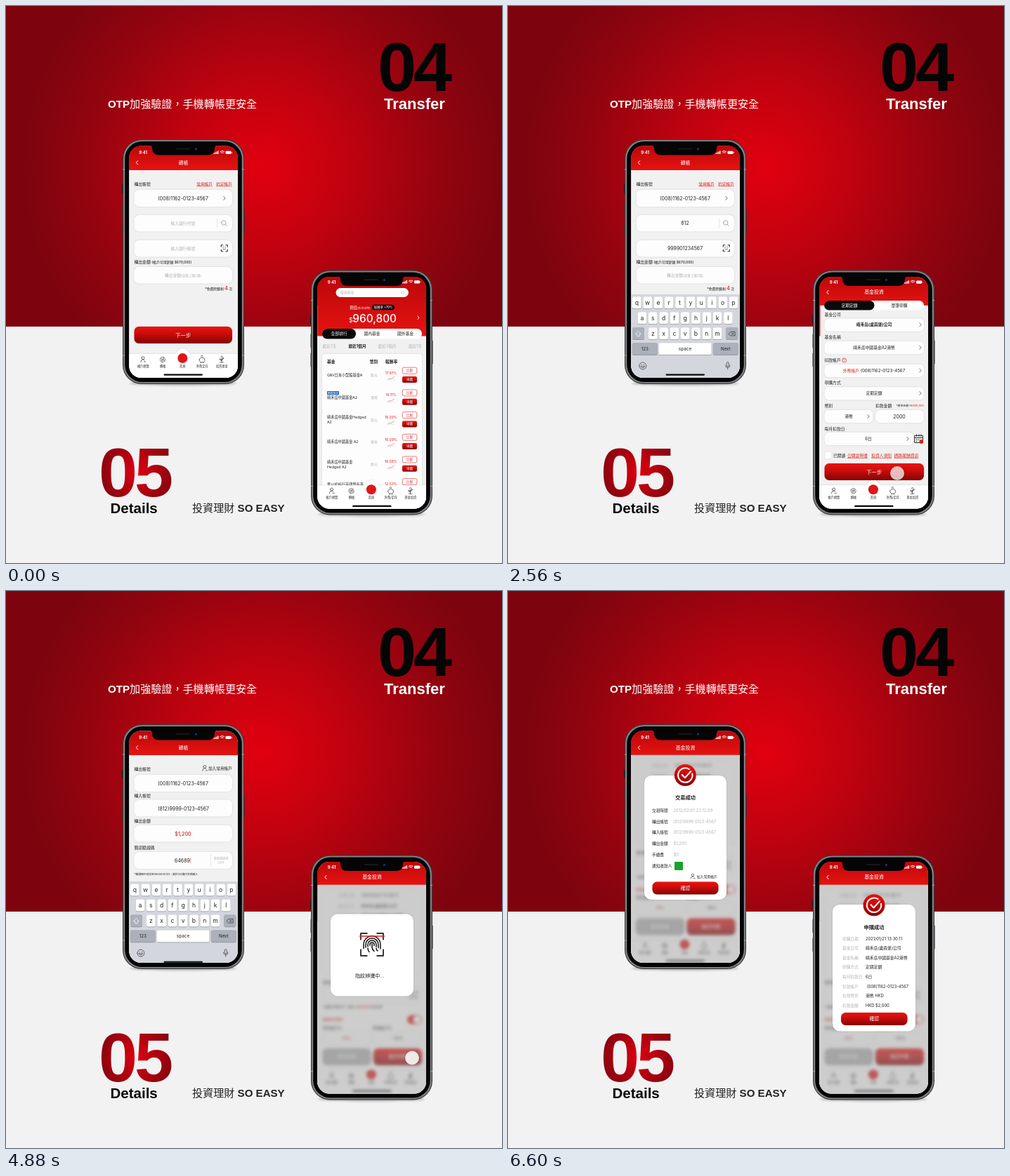
An HTML page for the animation above (6640 ms loop, 706x794 px).

```html
<!DOCTYPE html>
<html lang="zh-Hant">
<head>
<meta charset="utf-8">
<title>Transfer / Details</title>
<style>
html, body { margin: 0; width: 100%; height: 100%; overflow: hidden; background: #f2f2f2; }
svg { display: block; }
text { font-family: Inter, "Noto Sans CJK TC", "Noto Sans CJK JP", sans-serif; fill: #222; white-space: pre; }
.arial { font-family: "Liberation Sans", Arial, "Noto Sans CJK TC", sans-serif; }
.m { text-anchor: middle; }
.e { text-anchor: end; }
.b { font-weight: 500; }
.thin { font-weight: 300; }
.h { font-weight: 700; }
.big { font-size: 99px; letter-spacing: -4px; }
.r { fill: #e0201c; }
.g { fill: #b4b4b4; }
.w { fill: #fff; }
.u { text-decoration: underline; text-decoration-thickness: .4px; text-underline-offset: 1px; }
.card { filter: drop-shadow(0 .8px .9px #0002); }
.line { fill: none; stroke: #333; stroke-width: .7; stroke-linecap: round; stroke-linejoin: round; }
.blur { filter: blur(2.2px); mix-blend-mode: multiply; opacity: .62; }
.touch { fill: #fafafa; filter: drop-shadow(0 .6px 1px #0007); }
.a { animation: 6.64s ease-in-out infinite; }

@keyframes transferPage { 0%, 52.7% { transform: none } 56.3%, 100% { transform: translateX(-157px) } }
@keyframes listPage { 0%, 11.1% { transform: none } 14.2%, 100% { transform: translateX(-157px) } }
@keyframes fundPage { 0%, 44.45% { transform: none } 48.1%, 100% { transform: translateX(-157px) } }
@keyframes leftKeys {
  0%, 5.4%, 51.5%, 62.7%, 75.9%, 100% { transform: translateY(121px) }
  8.4%, 49.7%, 65.4%, 73.2% { transform: none }
}
@keyframes rightKeys {
  0%, 18.7%, 35.8%, 100% { transform: translateY(121px) }
  21.7%, 33.1% { transform: none }
}
@keyframes finger { 0%, 53.6%, 76.2%, 100% { opacity: 0 } 56%, 73.8% { opacity: 1 } }
@keyframes leftDone { 0%, 84.6% { opacity: 0 } 87.3%, 100% { opacity: 1 } }
@keyframes rightDone { 0%, 84.9% { opacity: 0 } 87.7%, 100% { opacity: 1 } }
@keyframes leftTouch {
  0%, 1.8% { transform: translate(231px, 309px); opacity: 0 }
  3.6%, 4.5% { transform: translate(231px, 309px); opacity: .9 }
  6.3% { transform: translate(231px, 309px); opacity: 0 }
  12.8% { transform: translate(231px, 344.5px); opacity: 0 }
  14.3%, 28.6% { transform: translate(231px, 344.5px); opacity: .9 }
  31.6% { transform: translate(231px, 344.5px); opacity: 0 }
  39.8% { transform: translate(221px, 383px); opacity: 0 }
  41.6%, 47.6% { transform: translate(221px, 383px); opacity: .9 }
  50.6% { transform: translate(252px, 469px); opacity: .7 }
  52.4% { transform: translate(252px, 469px); opacity: 0 }
  55.1% { transform: translate(235px, 379.5px); opacity: 0 }
  56.6%, 61.7% { transform: translate(235px, 379.5px); opacity: 1 }
  63.3% { transform: translate(235px, 379.5px); opacity: 0 }
  78.9% { transform: translate(269px, 470px); opacity: 0 }
  80.4% { transform: translate(269px, 470px); opacity: .9 }
  82.5%, 84.3% { transform: translate(269px, 470px); opacity: .32 }
  85.2%, 100% { transform: translate(269px, 470px); opacity: 0 }
}
@keyframes rightTouch {
  0%, 6.3% { transform: translate(574px, 565px); opacity: 0 }
  7.8% { transform: translate(574px, 565px); opacity: .9 }
  9.9% { transform: translate(574px, 565px); opacity: .4 }
  11.4% { transform: translate(574px, 565px); opacity: 0 }
  13.9% { transform: translate(570px, 576.5px); opacity: 0 }
  15.1% { transform: translate(570px, 576.5px); opacity: .5 }
  16.6% { transform: translate(569px, 577px); opacity: .9 }
  27.7% { transform: translate(566px, 578px); opacity: .5 }
  30.1% { transform: translate(566px, 578px); opacity: 0 }
  37% { transform: translate(554px, 666px); opacity: 0 }
  39.2% { transform: translate(554px, 666px); opacity: .9 }
  41.6%, 47.6% { transform: translate(554px, 666px); opacity: .35 }
  52.4% { transform: translate(581px, 590px); opacity: .9 }
  57%, 62.7% { transform: translate(581px, 594px); opacity: .95 }
  71.7% { transform: translate(578px, 664px); opacity: .9 }
  75.9% { transform: translate(578px, 668px); opacity: .9 }
  81.9%, 84.3% { transform: translate(578px, 668px); opacity: .35 }
  85.2%, 100% { transform: translate(578px, 668px); opacity: 0 }
}
@keyframes scan { from { transform: translateY(-15px) } to { transform: translateY(10px) } }
#beam { animation: scan .83s linear infinite alternate; }
</style>
</head>
<body>
<svg id="stage" width="706" height="794" viewBox="0 0 706 794"></svg>
<script>
const LOOP = 6640;
const stage = document.getElementById('stage');

// y is the vertical middle of the line of text
const text = (x, y, size, str, cls = '', id = '') =>
  `<text x="${x}" y="${(y + size * .36).toFixed(2)}" font-size="${size}" class="${cls}" id="${id}">${str}</text>`;
const box = (x0, y0, x1, y1, r, fill = '#fdfdfd', cls = '') =>
  `<rect x="${x0}" y="${y0}" width="${x1 - x0}" height="${y1 - y0}" rx="${r}" fill="${fill}" class="${cls}"/>`;
const field = (x0, y0, x1, y1, r = 7) => box(x0, y0, x1, y1, r, '#fdfdfd', 'card');
const line = (d, extra = '') => `<path class="line" d="${d}" ${extra}/>`;
const dot = (x, y, r, fill) => `<circle cx="${x}" cy="${y}" r="${r}" fill="${fill}"/>`;
const at = (x, y, body) => `<g transform="translate(${x} ${y})">${body}</g>`;
const move = (name, body) => `<g class="a" style="animation-name:${name}">${body}</g>`;
const span = (cls, str, size) => `<tspan class="${cls}" ${size ? `font-size="${size}"` : ''}>${str}</tspan>`;
const arrow = (x, y) => line(`M${x - 1.2} ${y - 2.5}l2.4 2.5l-2.4 2.5`, 'stroke="#777"');
const button = (x0, y0, x1, y1, str, size = 7, fill = 'url(#btn)') =>
  box(x0, y0, x1, y1, 6.5, fill, 'card') + text((x0 + x1) / 2, (y0 + y1) / 2, size, str, 'm w');
const typed = (x, y, id, hint, hintX = x) =>
  text(hintX, y, 5.8, hint, 'm g', id + 'Hint') + text(x, y, 7, '', 'm', id);
const corners = (cx, cy, s, w) => line([[-1, -1], [1, -1], [1, 1], [-1, 1]].map(([a, b]) =>
  `M${cx + a * s} ${cy + b * s * .45}V${cy + b * s}H${cx + a * s * .45}`).join(''), `style="stroke-width:${w}"`);
const scanIcon = (x, y) => corners(x, y, 4.5, 1.1) + line(`M${x - 2} ${y + 1}q2 2 4 0M${x - 2} ${y - 1.5}h1M${x + 1} ${y - 1.5}h1`);
const person = (x, y, s = 1) => at(x, y, `<g transform="scale(${s})">` +
  line('M-2 -1.8a2 2 0 1 1 4 0a2 2 0 1 1 -4 0M-3.2 4q.2 -3.6 3.2 -3.6q1.5 0 2.3 1M1.4 3.6h2.4') + '</g>');

const defs = `<defs>
  <radialGradient id="sky" gradientUnits="userSpaceOnUse" cx="365" cy="230" r="340">
    <stop offset="0" stop-color="#e1000f"/><stop offset=".35" stop-color="#c1020f"/>
    <stop offset=".75" stop-color="#92040f"/><stop offset="1" stop-color="#7d040e"/></radialGradient>
  <radialGradient id="five" gradientUnits="userSpaceOnUse" cx="186" cy="664" r="58">
    <stop offset="0" stop-color="#df0010"/><stop offset="1" stop-color="#80050f"/></radialGradient>
  <linearGradient id="btn" x2="0" y2="1"><stop offset="0" stop-color="#e8130f"/>
    <stop offset=".4" stop-color="#cd0d0c"/><stop offset="1" stop-color="#850303"/></linearGradient>
  <linearGradient id="head" x2="0" y2="1"><stop offset="0" stop-color="#ba070b"/>
    <stop offset="1" stop-color="#e61310"/></linearGradient>
  <clipPath id="glass"><rect x="175.3" y="199.5" width="154.7" height="330.5" rx="17"/></clipPath>
  <clipPath id="glass2"><rect x="443.3" y="386" width="154.7" height="330.5" rx="17"/></clipPath>
  <clipPath id="below"><rect x="440" y="419" width="162" height="300"/></clipPath>
</defs>`;

const body = () => `<ellipse cx="252" cy="538" rx="76" ry="3" fill="#0004" style="filter:blur(1.5px)"/>` +
  box(165, 254, 168, 267, 1, '#1c1c1e') + box(165.5, 281, 168, 301, 1, '#333') + box(165.5, 308, 168, 328, 1, '#333') +
  box(337, 290, 339.6, 324, 1, '#333') + box(166, 190, 339, 539, 27, '#3c3c3f') +
  box(167.2, 191.2, 337.8, 537.8, 26, '#85868a') + box(169.2, 193, 335.8, 536, 24.5, '#050506') +
  line('M166.3 233h2.500M336.200 233h2.500M166.3 498h2.500M336.200 498h2.500', 'style="stroke:#bbb"');
const notch = () => `<path d="M204 198.5q4 .5 4 4q0 10 10 10h69q10 0 10 -10q0 -3.500 4 -4z" fill="#050506"/>` +
  box(242, 202.8, 262, 204.4, .8, '#1b1b1e') + dot(270.5, 204, 1.7, '#17306e');
const phone = (dx, dy, clip, screens) =>
  at(dx, dy, body()) + `<g clip-path="url(#${clip})">${screens}</g>` + at(dx, dy, notch());

const header = (dx, dy, title, height = 35) => at(dx, dy,
  box(173, 198, 333, 199 + height, 0, 'url(#head)') + text(195, 209, 5.7, '9:41', 'm w h') +
  [0, 1, 2, 3].map(i => box(295.5 + i * 1.9, 209.5 - i, 296.8 + i * 1.9, 211, .3, '#fff')).join('') +
  line('M304.800 207.600q2.900 -2.600 5.800 0M306.200 209.200q1.500 -1.300 3 0', 'style="stroke:#fff;stroke-width:1"') +
  box(312.5, 206.7, 320.5, 211, 1.2, '#fff') + box(321, 208, 321.8, 209.8, .3, '#fff') +
  (title ? text(252.5, 223.2, 6.9, title, 'm w b') +
    line('M187.600 220.700l-2.300 2.600l2.300 2.600', 'style="stroke:#fff;stroke-width:1"') : ''));

const homeBar = () => box(224.5, 524.5, 280, 526.7, 1.1, '#0a0a0a');
const tabIcons = [
  person(195, 503.5),
  at(223, 504, line('M-3.800 0a3.800 3.800 0 0 1 7.300 -1.400M3.800 0a3.800 3.800 0 0 1 -7.300 1.400M-2 -.8h4l-1.200 -1.200M2 .9h-4l1.200 1.200')),
  dot(251.3, 502, 7, '#df1616'),
  at(279, 504.5, line('M-4 -.5q1 -2.700 4 -2.700q4 0 4 3.200q0 1.600 -1.300 2.700v1.300h-1.500v-.8h-2v.8h-1.500v-1.300q-1.700 -1 -1.700 -3.200M-1.200 -4.500a1.200 1.200 0 1 1 2 0')),
  at(307, 504, line('M0 4v-5M0 1.500q-3 0 -3 -2.500q3 0 3 2.500M0 0q3 0 3 -2.500q-3 0 -3 2.500M-2.500 4h5M-1 -3a1.200 1.200 0 1 1 2 0'))
].join('');
const tabBar = (dx, dy, labels) => at(dx, dy,
  `<g class="card"><path d="M173 496h66q3 0 4 -2.500a9.500 9.500 0 0 1 16.600 0q1 2.500 4 2.500h70v36h-161z" fill="#fff"/></g>` +
  tabIcons + labels.map((s, i) => text(195.3 + i * 28, 513.6, 4.2, s, 'm b')).join('') + homeBar());
const leftTabs = () => tabBar(0, 0, ['帳戶總覽', '轉帳', '首頁', '外幣定存', '投資基金']);
const rightTabs = () => tabBar(268.6, 187.3, ['帳戶總覽', '轉帳', '首頁', '外幣/定存', '基金投資']);
const paper = (dx = 0, dy = 0) => at(dx, dy, box(173, 198, 333, 533, 0, '#f1f1f1'));

const key = (x, y, w, s, fill = '#fff', cls = '', size = 8.6) =>
  box(x - w / 2, y - 8.7, x + w / 2, y + 8.7, 2.3, '#8d9096') + box(x - w / 2, y - 9, x + w / 2, y + 8, 2.3, fill) +
  text(x, y - .3, size, s, 'm ' + cls);
const keyboard = (action, fill, cls) => {
  const row = (letters, x, y) => [...letters].map((c, i) => key(x + i * 15.3, y, 12.6, c)).join('');
  const grey = '#abb0ba';
  return box(173, 411, 333, 533, 0, '#d3d6dc') +
    row('qwertyuiop', 183.3, 423.3) + row('asdfghjkl', 191, 445.3) + row('zxcvbnm', 206.3, 467.3) +
    key(185.5, 467.3, 17, '', grey) + line('M185.500 463.500l3.800 4h-2v3.200h-3.600v-3.200h-2z', 'style="stroke:#fff"') +
    key(318.8, 467.3, 17, '', grey) + line('M314.300 467.200l2.600 -2.800h6.200v5.600h-6.200zM318.300 465.800l2.800 2.800M321.100 465.800l-2.800 2.800') +
    key(194.8, 489.3, 36, '123', grey, '', 6.2) + key(252, 489.3, 75, 'space', '#fff', '', 6.4) +
    key(309.8, 489.3, 36, action, fill || grey, cls, 6.2) +
    line('M186.800 513a5 5 0 1 1 10 0a5 5 0 1 1 -10 0M189 514q2.800 3.600 5.600 0zM190 511v.8M193.600 511v.8') +
    line('M311.200 511.500v-2.400a1.500 1.500 0 0 1 3 0v3.400a1.500 1.500 0 0 1 -3 0zM309.400 512q0 3.400 3.300 3.400q3.300 0 3.300 -3.400M312.700 515.400v2.400') +
    homeBar();
};

const account = '(008)1162-0123-4567';
const payee = '(812)9999-0123-4567';
const label = (x, y, s, size = 5.8) => text(x, y, size, s, 'b');

const transferPage = paper() + header(0, 0, '轉帳') +
  label(182.5, 253.5, '轉出帳號') + text(294, 253.5, 5.7, '常用帳戶', 'e r u') + text(322, 253.5, 5.7, '約定帳戶', 'e r u') +
  field(182.5, 262, 322, 286) + text(252, 274, 7, account, 'm') + arrow(311, 274) +
  field(182.5, 298, 322, 321.5) + typed(252, 309.5, 'bank', '輸入銀行代號') +
  line('M300.500 303v13', 'style="stroke:#ddd"') + line('M306.600 309a3.200 3.200 0 1 1 6.400 0a3.200 3.200 0 1 1 -6.400 0M312.200 311.500l2 2.200', 'style="stroke:#888"') +
  field(182.5, 334, 322, 357.5) + typed(252, 345.5, 'payee', '輸入銀行帳號') + scanIcon(310.8, 345.3) +
  text(182.5, 365, 5.8, '轉出金額 ' + span('', '(帳戶可用餘額 $670,000)', 4.9), 'b') +
  field(182.5, 372, 322, 395.5) + typed(252, 384, 'sum', '轉出金額' + span('', '(單筆上限2萬)', 4.6)) +
  text(322, 403, 4.8, '*免費跨轉剩 ' + span('r', '4', 7.5) + ' 次', 'e b') +
  button(182.5, 457, 322, 481, '下一步', 7.3) + leftTabs();

const confirmTransfer = paper() + header(0, 0, '轉帳') +
  label(182.5, 253.5, '轉出帳號') + person(282.8, 252.3) + text(322, 253, 5.7, '加入常用帳戶', 'e') +
  field(182.5, 262, 322, 286) + text(252, 274, 7, account, 'm') +
  label(182.5, 292.3, '轉入帳號') + field(182.5, 297.5, 322, 321.5) + text(252.5, 310, 7, payee, 'm') +
  label(182.5, 328, '轉出金額') + field(182.5, 334, 322, 357.5) + text(252, 346, 7.2, '$1,200', 'm r b') +
  label(182.5, 365.8, '簡訊驗證碼') + field(182.5, 372, 322, 396) + typed(252, 384, 'code', '輸入驗證碼', 246.5) +
  line('M291.500 376v15', 'style="stroke:#ddd"') + text(306, 381.3, 4.1, '重寄驗證碼', 'm g') + text(306, 387, 4.4, '', 'm g', 'count') +
  text(182.5, 403.7, 3.75, '*驗證碼已發送至0900000123，請於3分鐘內完成輸入') +
  text(252, 439.8, 5.7, span('r', '【注意】') + '交易款項將從您的帳戶轉出,', 'm b') +
  text(252, 448.3, 5.7, '請再次確認。確保交易安全。', 'm b') +
  button(182.5, 457, 250.5, 481, '修改內容', 6.6, '#afafaf') + button(254, 457, 322, 481, '立即轉出', 6.6) + leftTabs();

const funds = [
  [['Q&amp;V日本小型股基金A'], '歐元', '17.97%'],
  [['晴禾岳中國基金A2'], '港幣', '16.11%'],
  [['晴禾岳中國基金Hedged', 'A2'], '美元', '16.09%'],
  [['晴禾岳中國基金 A2'], '基金', '16.09%'],
  [['晴禾岳中國基金', 'Hedged A2'], '歐元', '16.08%'],
  [['雲川松谷行美國增長基'], '美元', '12.53%']
];
const fundRow = ([names, money, rate], i) => {
  const y = 526.5 + i * 31.7;
  return names.map((s, n) => text(457, y + (n - (names.length - 1) / 2) * 7 + (i === 5 ? -3 : 0), 5.2, s)).join('') +
    (i === 1 ? box(457, 549, 474, 554.2, .5, '#1766bd') + text(465.5, 551.6, 3.8, '精選基金', 'm w') : '') +
    text(524, y, 4.9, money, 'm g') + text(548, y - 3.7, 5, rate, 'm r') +
    line(`M543.500 ${y + 6}l2.500 -1.800l2 .8l4.500 -3`, 'style="stroke:#d33;stroke-width:.5"') +
    line(`M543 ${y + 6.5}h10`, 'style="stroke:#ccc;stroke-width:.4"') +
    `<rect x="564.3" y="${y - 11.3}" width="20.500" height="9" rx="2" fill="#fff" stroke="#e0201c" stroke-width=".6"/>` +
    text(574.5, y - 6.8, 4.4, '比較', 'm r') +
    box(564, y + 1.5, 585, y + 10.5, 2, 'url(#btn)') + text(574.5, y + 6, 4.4, '申購', 'm w b');
};
const listPage = paper(268, 186.5) + header(268.5, 184.5, '', 87) +
  box(469.5, 402, 573, 415, 6.5) + text(476, 408.5, 4.8, '搜尋基金', 'g') +
  line('M562.500 408a2 2 0 1 1 4 0a2 2 0 1 1 -4 0M566 409.500l1.500 1.500', 'style="stroke:#bbb;stroke-width:.5"') +
  text(489, 429.5, 5.6, '現值' + span('', '(折合台幣)', 3.9), 'w b') +
  box(521, 425.7, 553, 433.3, 3.8, '#0a0a0a') + text(537, 429.5, 4.4, '報酬率 +70%', 'm w b') +
  text(488, 447.5, 9, '$', 'w') + text(493.3, 445, 15.4, '960,800', 'w b') +
  line('M586 442l2 2.300l-2 2.300', 'style="stroke:#fff;stroke-width:.9"') +
  box(450, 460, 592, 474.5, 7) + box(450, 460, 498, 474.5, 7, '#0a0a0a') +
  text(474, 467.3, 5.8, '全部排行', 'm w b') + text(521, 467.3, 5.8, '國內基金', 'm b') + text(568.5, 467.3, 5.8, '國外基金', 'm b') +
  text(450.5, 485.3, 5.6, '最近7天', 'g') + text(500, 485.3, 5.7, '最近1個月', 'm h') +
  text(542.5, 485.3, 5.6, '最近3個月', 'm g') + text(592, 485.3, 5.6, '最近1年', 'e g') +
  field(450, 496, 592, 720, 4) + text(457, 507, 5.8, '基金', 'h') + text(523.5, 507, 5.8, '幣別', 'm h') + text(548.5, 507, 5.8, '報酬率', 'm h') +
  funds.map(fundRow).join('') + rightTabs();

const pick = (y, title, value) => label(450.5, y, title) + field(450.5, y + 5.8, 592, y + 24, 6) +
  text(521, y + 14.6, 5.8, value, 'm') + arrow(587, y + 14.6);
const fundPage = paper(268, 186.5) + header(268.5, 184.8, '基金投資', 43) +
  box(450, 420, 592, 433.5, 6.7) + box(450, 420, 521.5, 433.5, 6.7, '#0a0a0a') +
  text(486, 426.8, 5.8, '定期定額', 'm w b') + text(557, 426.8, 5.8, '單筆申購', 'm b') +
  pick(439.8, '基金公司', span('h', '晴禾岳(盧森堡)公司')) + pick(472.3, '基金名稱', '晴禾岳中國基金A2港幣') +
  pick(505, '扣款帳戶', span('r', '外幣帳戶') + ' ' + span('', account, 6.2)) +
  `<circle cx="478.5" cy="505" r="3" fill="none" stroke="#e0201c" stroke-width=".7"/>` + text(478.5, 505, 4.6, '?', 'm r') +
  pick(537.4, '申購方式', '定期定額') +
  label(450.5, 570, '幣別') + label(523, 570, '扣款金額') +
  text(592, 570, 3.9, '*最低金額 ' + span('r', 'HKD$1,000'), 'e') +
  field(450.5, 576, 519.5, 594, 6) + text(485, 585, 5.8, '港幣', 'm') + arrow(513, 585) +
  field(523, 576, 592, 594, 6) + typed(557, 585, 'fund', '輸入金額') +
  label(450.5, 602.5, '每月扣款日') + field(450.5, 608, 577, 626, 6) + text(513, 617, 6, '6日', 'm') + arrow(569, 617) +
  line('M579 612.500h11.500v10h-11.500zM579 615.500h11.500M581.500 610.800v2.500M585 610.800v2.500M588 610.800v2.500M581 618h1M584 618h1M581 620.500h1', 'style="stroke-width:1"') +
  dot(588.3, 621, 2.9, '#e0201c') +
  field(451, 635.5, 460.5, 645, 1.5) + text(463, 641, 5.8, '已閱讀') + text(483, 641, 5.8, '公開說明書', 'r u') +
  text(517, 641, 5.8, '投資人須知', 'r u') + text(549.5, 641, 5.8, '通路報酬資訊', 'r u') +
  button(450.5, 652, 592, 676, '下一步', 7.3) + rightTabs();

const details = [
  ['申購日期', '2021/01/21 13:30:11'], ['基金公司', '晴禾岳(盧森堡)公司'], ['基金名稱', '晴禾岳中國基金A2港幣'],
  ['申購方式', '定期定額'], ['每月扣款日', '6日'], ['扣款帳戶', ' ' + account], ['扣款幣別', '港幣 HKD'], ['扣款金額', 'HKD $2,000']
];
const rows = (list, x, vx, y, step, a = 'g', b = '') => list.map(([k, v], i) =>
  text(x, y + i * step, 5.7, k, a) + text(vx, y + i * step, 5.8, v, b)).join('');
const confirmBody = pass => field(450, 424, 592, 546, 4) + rows(details, 473, 506, 434, 14.45) +
  label(450.5, 558, '使用者密碼') + field(450.5, 565, 592, 587.5) + pass +
  line('M570.500 569v13', 'style="stroke:#ddd"') + scanIcon(580.3, 576) +
  text(450.5, 594, 4.15, '*請確認申購內容，並輸入' + span('r', '使用者密碼') + '完成申購') +
  text(450.5, 611, 5.9, '報酬率通知', 'r') + box(571, 604.5, 592, 617.5, 6.5, '#e3221b') + dot(585.3, 611, 5.7, '#fff') +
  label(450.5, 622.7, '停利點(%)') + label(521.5, 622.7, '停損點(%)') +
  field(450.5, 628, 519.5, 647.5) + text(485, 637.7, 6, '10%', 'm r') + field(523, 628, 592, 647.5) + text(557, 637.7, 6, '−10%', 'm') +
  button(450.5, 652, 519.5, 676, '修改內容', 6.6, '#afafaf') + button(523, 652, 592, 676, '確認申購', 6.6) + rightTabs();
const confirmFund = paper(268, 186.5) + header(268.5, 184.8, '基金投資') + confirmBody(text(521, 576, 5.8, '', 'm g', 'pass'));

// multiplied onto grey, so white cards vanish and only ink shows
const veil = `<g clip-path="url(#below)">${box(440, 419, 602, 720, 0, '#cdcdcd')}<g class="blur">${confirmBody('')}</g></g>`;
const tick = (x, y) => dot(x, y, 15.5, 'url(#btn)') +
  line(`M${x + 5.5} ${y - 8.5}a10.200 10.200 0 1 0 4.500 6.500M${x - 4.5} ${y - .5}l4 4.300l8.500 -9.300`, 'style="stroke:#fff;stroke-width:2"');

const prints = [3, 6, 9, 12].map(r => `M${521 - r} ${504 + r * .45}v${-r * .45}a${r} ${r} 0 0 1 ${2 * r} 0v${r * .5}`).join('') +
  'M521 503v4q0 4 3 6.500M515 509q0 3 2 5.500M527 509q0 3 2 4';
const fingerDialog = veil + box(462, 460.5, 580, 577.5, 10, '#fff', 'card') + corners(521, 504, 16, 1.9) +
  line(prints, 'style="stroke:#111;stroke-width:1.5"') +
  `<rect id="beam" x="503" y="503.300" width="36" height="1.500" fill="#e0201c"/>` + text(497, 548, 7.1, '', '', 'reading');
const fundDone = veil + box(462, 447, 580, 627.5, 10, '#fff', 'card') + tick(521, 447.7) +
  text(521, 479, 7.3, '申購成功', 'm h') + rows(details, 476, 509, 495.5, 13.6) + button(474, 601, 568.5, 619, '確認', 6.8);
const receipt = [['交易時間', '2012/02/01 23:12:09'], ['轉出帳號', payee], ['轉入帳號', payee],
  ['轉出金額', '$1,200'], ['手續費', '$0'], ['通知收款人', '']];
const transferDone = header(0, 0, '基金投資') + at(-268.5, -185.5, veil) +
  box(194, 263, 311, 440, 10, '#fff', 'card') + tick(252.3, 262.5) + text(252.5, 294, 7.3, '交易成功', 'm h') +
  rows(receipt, 205, 235.5, 312.5, 15.95, 'b', 'g') + box(237, 386, 249, 398, 1, '#17a32b') +
  person(263, 406.5, .9) + text(298, 407.5, 4.9, '加入常用帳戶', 'e') + button(205.5, 414.5, 299.5, 432.5, '確認', 6.8);

const touch = name => move(name, '<circle class="touch" r="10"/>');

stage.innerHTML = defs + box(0, 0, 706, 794, 0, '#f2f2f2') + box(0, 0, 706, 457, 0, 'url(#sky)') +
  `<g class="h">
    <text class="arial big" x="529" y="121" style="fill:#050505">04</text>
    <text class="arial w" x="538" y="146.500" font-size="22">Transfer</text>
    <text class="arial big" x="132" y="698.500" style="fill:url(#five)">05</text>
    <text class="arial" x="148.500" y="723" font-size="20.500" style="fill:#0a0a0a">Details</text>
  </g>
  <text class="arial w" x="145" y="145" font-size="15.100"><tspan class="h">OTP</tspan><tspan class="thin">加強驗證，手機轉帳更安全</tspan></text>
  <text class="arial" x="265" y="720.500" font-size="15.100"><tspan class="thin">投資理財 </tspan><tspan class="h">SO EASY</tspan></text>` +
  phone(0, 0, 'glass', confirmTransfer + move('transferPage', transferPage) +
    move('leftKeys', keyboard('Next')) + move('leftDone', transferDone) + touch('leftTouch')) +
  phone(268, 186.5, 'glass2', confirmFund + move('fundPage', fundPage) + move('listPage', listPage) +
    move('rightKeys', at(268.3, 186.8, keyboard('Go', '#0a7aff', 'w'))) +
    move('finger', fingerDialog) + move('rightDone', fundDone) + touch('rightTouch'));

// id, first key press, ms per key, text
const entries = [
  ['bank', 620, 80, '812'], ['payee', 1420, 100, '999901234567'], ['sum', 2960, 100, '1200'],
  ['code', 4400, 90, '64689'], ['fund', 1540, 90, '2000']
];
const get = id => document.getElementById(id);
const setText = (id, value) => { if (get(id).innerHTML !== value) get(id).innerHTML = value; };

function show(t) {
  for (const [id, start, step, str] of entries) {
    const count = Math.max(0, Math.floor((t - start) / step) + 1);
    const caret = count > 0 && t < start + step * str.length + 150 && Math.floor(t / 250) % 2;
    setText(id, str.slice(0, count) + (caret ? '<tspan fill="#e0201c" font-weight="300">|</tspan>' : ''));
    get(id + 'Hint').style.display = count ? 'none' : '';
  }
  setText('count', `(${120 - Math.max(0, Math.floor((t - 3800) / 340))})`);
  setText('pass', t < 4600 ? '交易密碼' : '認證成功');
  setText('reading', '指紋辨識中' + '.'.repeat(1 + Math.floor(t / 300 + 1) % 3));
}

let begin;
function tickClock(now) {
  begin ??= now;
  show((now - begin) % LOOP);
  requestAnimationFrame(tickClock);
}
show(0);
requestAnimationFrame(tickClock);
</script>
</body>
</html>
```
